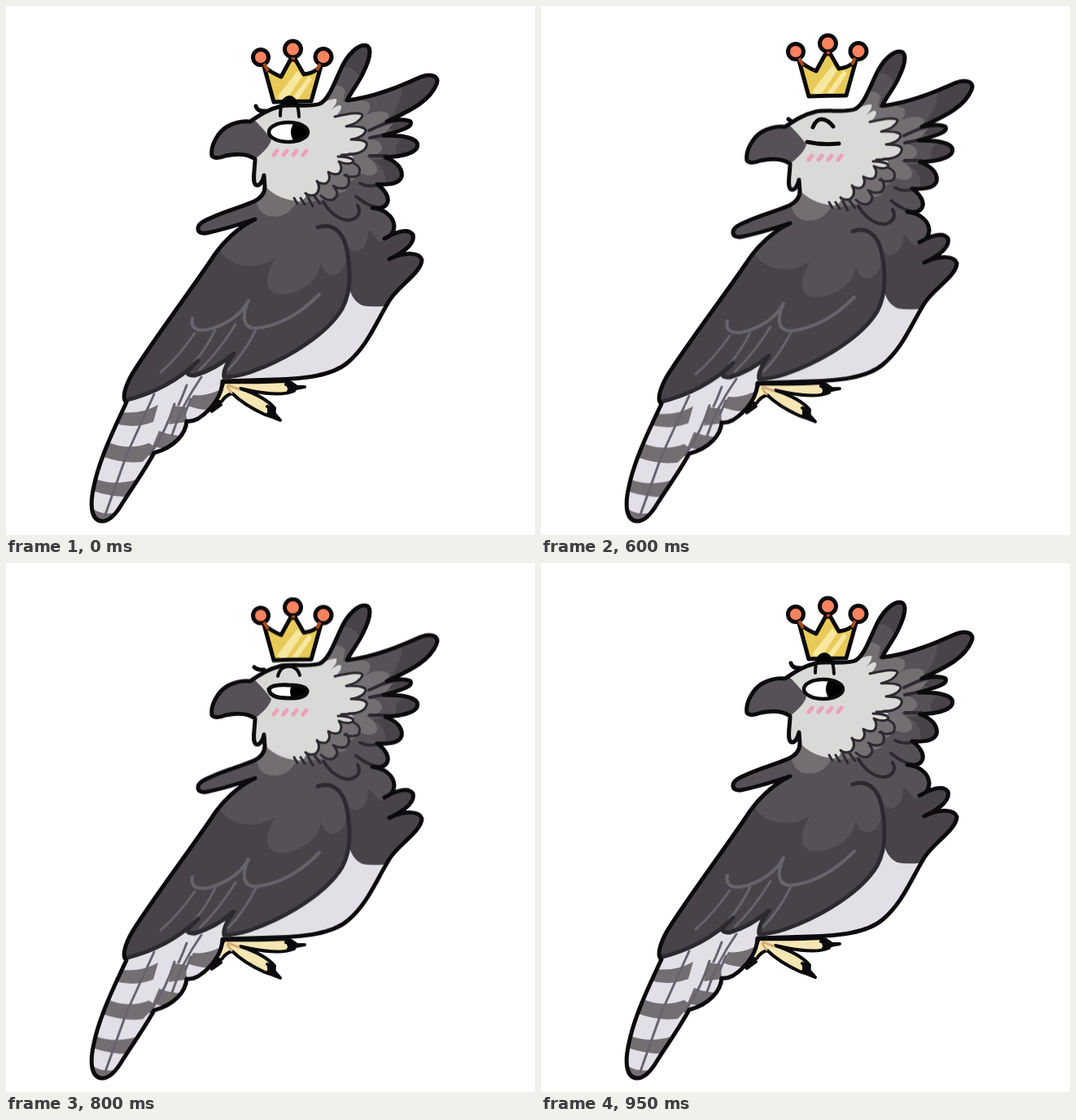
An HTML page that plays this animation: 650x650 px, repeating every 1 s.

```html
<!DOCTYPE html>
<html lang="en">
<head>
<meta charset="utf-8">
<title>Blinking eagle with a crown</title>
<style>
html, body { margin: 0; width: 100%; height: 100%; overflow: hidden; background: #fff; }
svg { display: block; width: 100vw; height: 100vh; }

.ink { fill: none; stroke: #0b0a0c; stroke-width: 5; stroke-linecap: round; stroke-linejoin: round; }
.line { fill: none; stroke: #2c2930; stroke-width: 4; stroke-linecap: round; stroke-linejoin: round; }
.quill { fill: none; stroke: #66636c; stroke-width: 4; stroke-linecap: round; stroke-linejoin: round; }
.dark { fill: #474348; }
.mid { fill: #555157; }
.grey { fill: #736e72; }
.pale { fill: #d9d9d8; }
.white { fill: #e3dfe6; }

.body, .crown, .open, .half, .shut { animation: 1s step-end infinite; }
.body { transform-origin: 0 633px; animation-name: squash; }
.crown { animation-name: hop; }
.open { animation-name: open; }
.half { animation-name: half; }
.shut { animation-name: shut; }

@keyframes squash {
  0%, 85% { transform: none; }
  50%, 80% { transform: scaleY(.9935); }
  55%, 75% { transform: scaleY(.9875); }
  60%, 70% { transform: scaleY(.987); }
}
@keyframes hop {
  0%, 85% { transform: none; }
  50% { transform: translateY(-3px); }
  55% { transform: translateY(-5.5px); }
  60% { transform: translateY(-7px); }
  65% { transform: translateY(-5.5px); }
  70% { transform: translateY(-2.5px); }
  75% { transform: translateY(0); }
  80% { transform: translateY(1.5px); }
}
@keyframes open { 0%, 85% { opacity: 1; } 50% { opacity: 0; } }
@keyframes half { 0%, 55%, 85% { opacity: 0; } 50%, 80% { opacity: 1; } }
@keyframes shut { 0%, 80% { opacity: 0; } 55% { opacity: 1; } }
</style>
</head>
<body>
<svg viewBox="0 0 650 650">
  <defs>
    <path id="shape" d="M300 142C312 134 322 127 338 123C355 120 372 125 386 120
      C398 113 404 92 414 72C424 54 436 46 444 49C451 54 444 72 438 84C432 96 424 106 419 116
      C455 112 490 96 510 87C524 82 533 87 529 96C521 116 500 127 468 142
      C482 139 492 139 497 142C500 148 490 152 464 159C482 159 500 160 505 168C508 176 500 184 466 186
      C480 191 488 200 486 210C483 219 470 220 456 219C466 226 472 236 468 243C464 249 458 249 450 248
      C464 249 476 258 477 270C477 279 471 284 465 286C478 278 494 272 500 281C503 292 490 302 471 311
      C490 302 508 302 511 312C510 328 482 344 471 362C455 388 444 418 420 438C400 455 365 458 330 459L266 461
      C266 475 255 495 236 507Q229 511 222 510C221 525 208 542 182 549C172 568 155 592 143 611
      C133 628 125 634 117 633C104 631 103 612 108 590C114 560 130 525 148 487
      C142 483 146 468 155 452C180 412 225 352 252 312C265 291 285 272 306 262
      C285 269 262 276 246 279C234 281 232 270 244 264C262 254 290 247 305 240C315 235 318 229 318 222
      L317 208C316 214 312 222 307 220C302 216 306 200 306 188
      C296 181 284 181 270 184C262 187 256 188 253 184C251 172 260 155 272 148C281 143 292 141 300 142Z"/>
    <clipPath id="inside"><use href="#shape"/></clipPath>
    <path id="metal" d="M317 74L329 118Q352 117 375 117L387 74Q378 83 366 84L355 65H350L338 87Q326 82 317 74Z"/>
    <clipPath id="gold"><use href="#metal"/></clipPath>
  </defs>

  <g class="body">
    <!-- feet -->
    <g fill="#f6e6b4" stroke="#0b0a0c" stroke-width="4" stroke-linejoin="round" stroke-linecap="round">
      <path d="M268 462Q310 463 344 461Q358 464 354 473Q338 480 302 473L288 470Q318 480 330 494Q330 504 318 502Q292 490 278 476Q270 478 265 486L255 490Q254 482 266 466Z"/>
      <path d="M344 465Q354 463 357 468L367 468Q355 470 347 473M321 492Q330 494 330 501L337 509Q326 504 321 503M262 486Q254 488 253 498L264 490" fill="#0b0a0c"/>
      <path d="M273 466L286 471M272 468L277 475" fill="none" stroke="#d3ad76" stroke-width="3"/>
    </g>

    <use href="#shape" class="dark"/>
    <g clip-path="url(#inside)">
      <!-- tail -->
      <path class="white" d="M140 484L190 465L240 435L275 430L268 470L240 515L185 555L130 645L90 640Z"/>
      <path class="grey" d="M142 499Q166 502 187 490L181 511Q158 520 134 513Z
        M128 537Q152 546 176 537L184 543L168 560Q146 563 120 554Z
        M110 581Q132 590 160 582L148 603Q128 603 104 595Z
        M104 616Q118 627 138 622L122 640L100 632Z
        M230 478Q244 480 262 472L250 496Q238 497 223 491Z
        M206 491L221 493L222 511L200 514Z
        M188 522Q202 528 219 528L205 543Q194 545 180 541Z"/>
      <path class="quill" stroke-width="3" style="stroke-width:3;stroke:#67636f" d="M182 477Q166 512 148 552L122 625M207 489Q198 520 177 551M240 456Q215 492 204 527M222 466Q216 482 212 490M227 483L220 500"/>

      <!-- belly -->
      <path class="white" d="M420 340Q424 362 438 368Q452 371 480 367L440 470H262V455L350 400Z"/>

      <!-- breast and back of neck -->
      <path class="mid" d="M310 258L318 220L400 200L455 215L480 250L478 280Q466 296 455 286Q448 275 445 276Q445 301 427 302Q418 297 415 282L370 290Z"/>
      <path class="mid" d="M228 285V255L310 232L318 264L246 285Z"/>

      <!-- wing -->
      <path class="dark" d="M383 272C400 266 413 276 418 296C424 325 424 352 413 372C395 402 350 432 300 450Q282 456 268 456Q266 446 280 427Q258 446 232 454Q220 454 224 448L236 436Q200 472 140 488L140 460L240 310L310 255L370 258Z"/>
      <path class="mid" d="M262 298C272 322 312 326 331 309C312 342 322 356 342 354C364 351 383 339 387 316C391 336 414 338 419 308C418 284 408 268 383 272L372 254H310Z"/>
      <path class="quill" d="M229 384C226 398 238 401 254 396C275 389 290 377 298 362C290 380 290 395 306 396C334 394 362 378 385 354"/>
      <path class="quill" style="stroke-width:3" d="M232 402Q212 431 190 450M257 398Q246 421 231 438M282 391Q262 424 238 447M307 398Q292 428 273 447"/>
      <path class="line" style="stroke-width:5" d="M383 272C400 266 413 276 418 296C424 325 424 352 413 372C395 402 350 432 300 450Q282 456 268 456Q266 446 280 427Q258 446 232 454Q220 454 224 448L236 436Q200 472 145 485"/>

      <!-- crest -->
      <path class="mid" d="M386 120L410 76Q428 72 434 88L418 118L486 96Q490 110 474 135L445 150H470L492 160Q475 168 480 185L450 190Q468 196 466 219L432 222L415 130Z"/>
      <path class="grey" d="M388 124L401 98Q412 96 417 104L414 118Q438 112 447 120Q449 130 440 135Q458 126 470 132Q474 140 455 150L476 144L464 158Q450 158 448 163Q463 166 462 176Q456 186 441 184Q457 192 456 203Q450 213 432 204L416 150Z"/>
      <path class="grey" d="M308 232Q306 252 322 258Q344 262 355 244L390 238Q402 241 406 229Q421 231 421 216Q434 213 434 198L430 180L370 210L318 225Z"/>

      <!-- face -->
      <path class="pale" d="M292 140L338 118L386 122Q396 114 406 114Q408 119 399 128Q412 118 412 125Q410 132 404 136Q438 128 438 135Q434 144 418 148Q443 147 442 154Q438 162 424 164Q446 164 443 172Q438 182 420 180Q430 186 426 192Q420 196 409 191Q415 200 409 206Q402 208 396 204Q400 214 393 218Q385 219 382 215Q388 225 380 232Q371 234 368 230Q370 238 360 240Q334 238 319 222L298 224Z"/>
      <path class="line" style="stroke-width:3" d="M404 136Q438 128 438 135Q434 144 418 148Q443 147 442 154Q438 162 424 164Q446 164 443 172Q440 183 412 183M408 185Q430 186 426 192Q420 196 409 191Q415 200 409 206Q402 208 396 204Q400 214 393 218Q385 219 382 215Q388 225 380 232Q371 234 368 230"/>
      <path class="line" style="stroke-width:3" d="M427 193Q438 198 433 208Q426 212 416 208M418 207Q425 216 418 223Q410 226 402 221M404 224Q411 232 402 238Q394 240 387 233M354 236L358 243M362 236L367 244M371 235L377 246M379 234L386 243"/>
      <path class="line" d="M390 241C401 259 420 270 432 258Q436 252 432 245M430 234Q448 249 465 248M447 184H468M435 218Q447 224 460 219M446 153L468 143M447 162L467 158"/>

      <!-- beak -->
      <path class="mid" d="M240 195V135H300Q317 151 326 164Q324 174 306 188Z"/>
    </g>
    <use href="#shape" class="ink"/>
    <path d="M329 183L333 178M341 183L345 178M353 183L357 178M365 183L369 178" fill="none" stroke="#eda0bb" stroke-width="5" stroke-linecap="round"/>
  </g>

  <g class="crown">
    <use href="#metal" fill="#e8ca59"/>
    <g clip-path="url(#gold)">
      <path d="M333 112L358 80L364 86L342 119ZM349 117L372 86L376 90L356 119Z" fill="#f8e79f"/>
      <path d="M312 70L324 76L321 84ZM345 60H360L357 69H348ZM391 70L380 77L383 84Z" fill="#a84a1d"/>
    </g>
    <use href="#metal" class="ink"/>
    <g class="ink" style="fill:#fb835f">
      <circle cx="313" cy="63" r="9.5"/><circle cx="352.500" cy="53" r="10"/><circle cx="390" cy="62.500" r="10"/>
    </g>
    <path d="M317 71L322 80M353 63V66M386 71L382 79" stroke="#a84a1d" stroke-width="4" fill="none"/>
  </g>

  <g class="open">
    <path class="ink" d="M307 123Q309 130 319 129"/>
    <path class="ink" style="stroke-width:4" d="M337 135Q337 113 348 113Q359 113 360 136"/>
    <path d="M338 121Q341 110 348 110Q356 110 358 121Z"/>
    <ellipse cx="347" cy="155" rx="24" ry="12" fill="#fff"/>
    <path d="M354 143Q346 155 354 167Q371 165 371 155Q371 145 354 143Z"/>
    <ellipse class="ink" style="stroke-width:4.500" cx="347" cy="155" rx="24" ry="12"/>
  </g>
  <g class="half" opacity="0">
    <path class="ink" d="M305 128Q309 132 317 131"/>
    <path class="ink" style="stroke-width:4" d="M334 139Q337 127 347 127Q358 127 361 138"/>
    <ellipse cx="346.500" cy="158" rx="24" ry="8.500" fill="#fff"/>
    <path d="M352 149Q346 158 352 167Q371 166 371 158Q371 150 352 149Z"/>
    <path class="ink" d="M323 155Q327 149 347 150Q370 150 370 158Q368 167 346 166Q324 166 323 155"/>
  </g>
  <g class="shut" opacity="0">
    <path class="ink" d="M304 139L308 142"/>
    <path class="ink" d="M334 149Q338 139 345 139Q353 140 359 148M327 167Q345 171 366 169"/>
  </g>
</svg>
</body>
</html>
```
